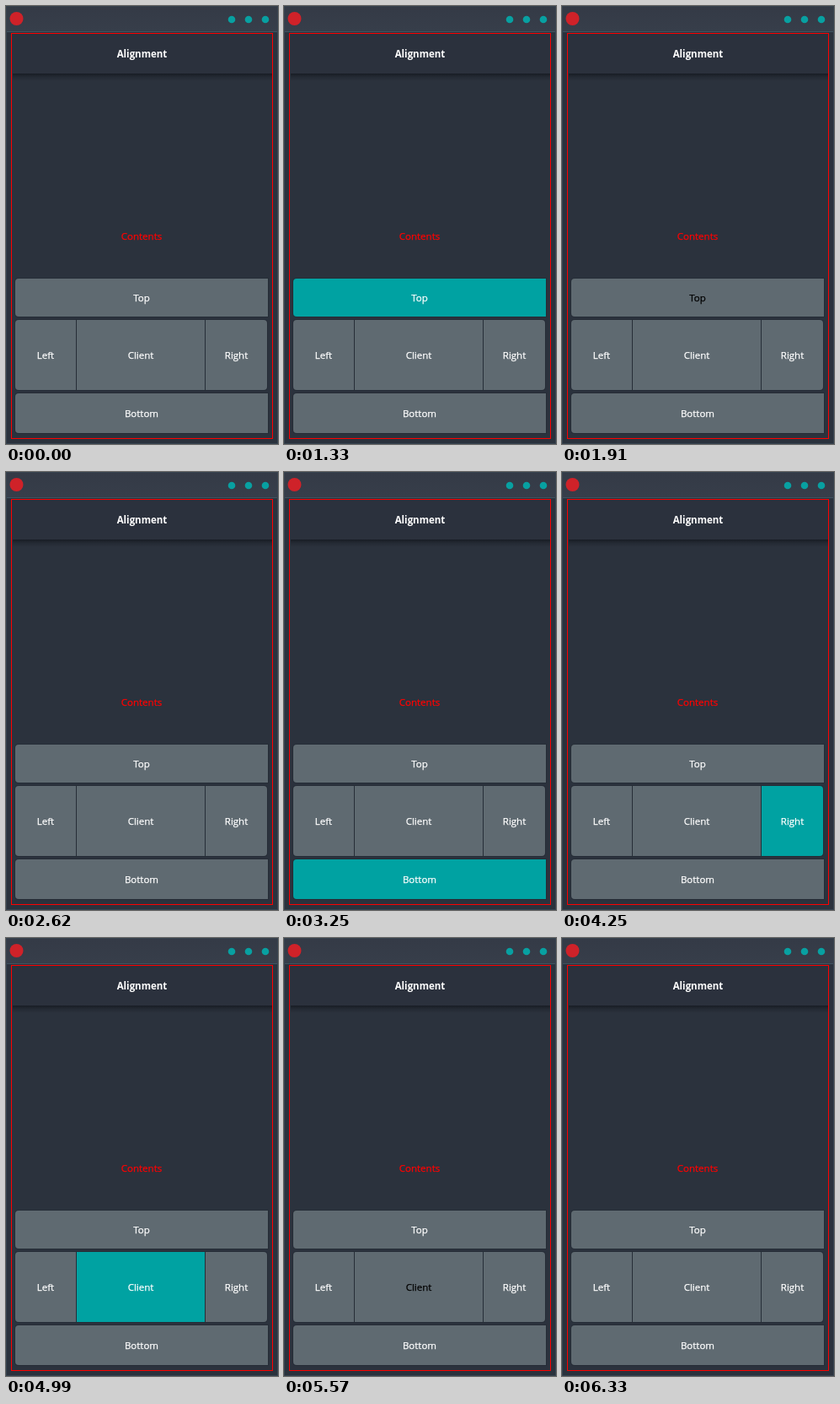
Recreate the animation shown at these times as an HTML page. Size 323x519 px, loop 6400 ms.

```html
<!DOCTYPE html>
<html lang="en">
<head>
<meta charset="utf-8">
<title>Alignment</title>
<style>
  html, body { margin: 0; width: 100%; height: 100%; overflow: hidden; background: #2b323d; }
  svg { display: block; }
  text {
    font: 11.5px "Open Sans", "Noto Sans", sans-serif;
    text-anchor: middle;
    color: #fff;
    fill: currentColor;
    stroke: currentColor;
    stroke-width: .25px;
  }
  .title { font-weight: 700; stroke: none; }
  .note { color: #f00; }
  .face {
    fill: currentColor;
    stroke: #262d37;
    stroke-width: 2px;
    paint-order: stroke;
  }
</style>
</head>
<body>
<svg width="323" height="519" viewBox="0 0 323 519">
  <defs>
    <linearGradient id="bar" x2="0" y2="1">
      <stop offset="0" stop-color="#343a46"/>
      <stop offset="1" stop-color="#373e4a"/>
    </linearGradient>
    <linearGradient id="shade" x2="0" y2="1">
      <stop offset="0" stop-color="#12161c" stop-opacity=".75"/>
      <stop offset=".45" stop-color="#12161c" stop-opacity=".3"/>
      <stop offset="1" stop-color="#12161c" stop-opacity="0"/>
    </linearGradient>
  </defs>

  <rect width="323" height="519" fill="#2b323d"/>
  <rect width="323" height="30" fill="url(#bar)"/>
  <rect y="30" width="323" height="1" fill="#3f5360"/>
  <rect x=".5" y=".5" width="322" height="518" fill="none" stroke="#36424e"/>
  <circle cx="12.5" cy="15" r="8" fill="#cf2229"/>
  <g fill="#08a0a1">
    <circle cx="268" cy="16" r="4.3"/>
    <circle cx="288" cy="16" r="4.3"/>
    <circle cx="308" cy="16" r="4.3"/>
  </g>

  <rect x="8" y="80" width="308" height="9" fill="url(#shade)"/>
  <rect x="7" y="33" width="309" height="47" fill="#2b313d"/>
  <text class="title" x="161.5" y="61">Alignment</text>
  <text class="note" x="161" y="277">Contents</text>

  <g id="buttons"></g>
  <rect x="6.5" y="32.5" width="310" height="480" fill="none" stroke="#f00"/>
</svg>

<script>
const LOOP = 6400;
const GREY = '#5f6a71', TEAL = '#00a2a2', WHITE = '#fff', BLACK = '#000';
const RADIUS = 4;

const group = document.getElementById('buttons');
const area = { x: 11, y: 323, w: 300, h: 183 };
const buttons = {};

function add(tag, attrs) {
  const el = document.createElementNS('http://www.w3.org/2000/svg', tag);
  for (const key in attrs) el.setAttribute(key, attrs[key]);
  return group.appendChild(el);
}

// Cuts a strip off one side of the free area and returns it
function dock(side, size, gap) {
  const box = { ...area };
  const [pos, len] = side === 'Top' || side === 'Bottom' ? ['y', 'h'] : ['x', 'w'];
  box[len] = size;
  area[len] -= size + gap;
  if (side === 'Top' || side === 'Left') area[pos] += size + gap;
  else box[pos] += area[len] + gap;
  return box;
}

// Outline with l as the left and r as the right corner radius
function outline({ x, y, w, h }, l, r) {
  return `M${x + l} ${y}h${w - l - r}q${r} 0 ${r} ${r}v${h - 2 * r}q0 ${r} ${-r} ${r}` +
         `h${l + r - w}q${-l} 0 ${-l} ${-l}v${2 * l - h}q0 ${-l} ${l} ${-l}z`;
}

function button(label, box) {
  const l = /Client|Right/.test(label) ? 0 : RADIUS;
  const r = label === 'Right' ? RADIUS : 0;
  const face = add('path', { d: outline(box, l, r), class: 'face', color: GREY });
  const text = add('text', { x: box.x + box.w / 2, y: box.y + box.h / 2 + 4.5 });
  text.textContent = label;
  buttons[label] = { face, text };
}

// Holds the "on" colour between two times, with hard changes
function flash(el, off, on, from, to) {
  const steps = [[0, off], [from, on], [to, off], [LOOP, off]];
  el.animate(
    steps.map(([t, color]) => ({ offset: t / LOOP, color, easing: 'steps(1, end)' })),
    { duration: LOOP, iterations: Infinity }
  );
}

button('Top', dock('Top', 45, 4));
button('Bottom', dock('Bottom', 47, 4));
area.w -= 1;
button('Left', dock('Left', 72, 1));
button('Right', dock('Right', 73, 1));
button('Client', area);

// Each visit: teal while held, black label from hover until the next visit
let time = 1330;
function visit(label, hold, hover, stay) {
  const { face, text } = buttons[label];
  flash(face, GREY, TEAL, time, time + hold);
  flash(text, WHITE, BLACK, time + hover, time + stay);
  time += stay;
}

visit('Top', 140, 580, 1150);
visit('Left', 140, 400, 770);
visit('Bottom', 70, 400, 1000);
visit('Right', 100, 400, 740);
visit('Client', 140, 580, 1340);
</script>
</body>
</html>
```
